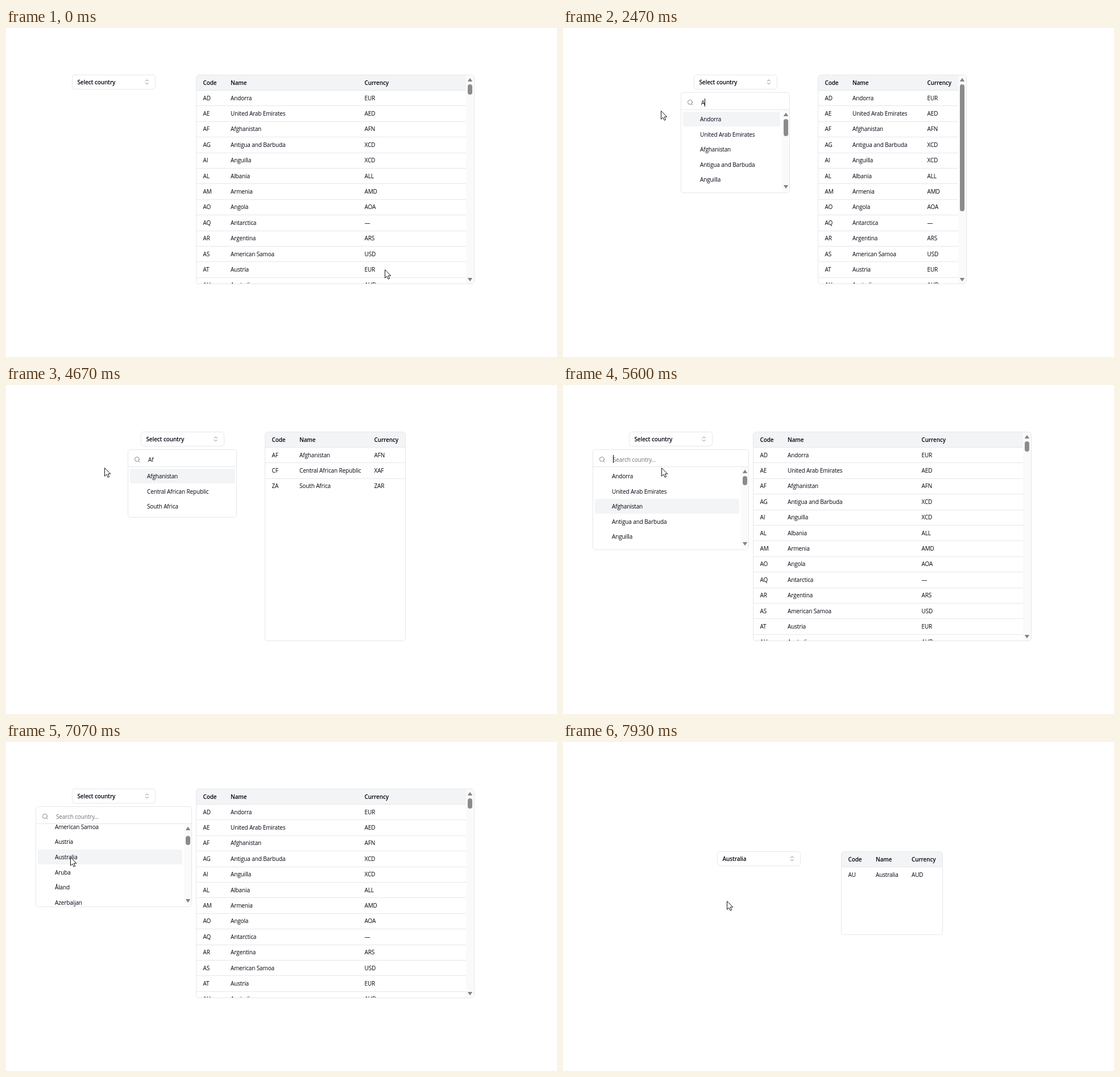
An HTML page for the animation above (8 s loop, 969 by 578 pixels).

```html
<!DOCTYPE html>
<html lang="en">
<head>
<meta charset="utf-8">
<title>Country picker</title>
<style>
  html, body { margin: 0; width: 100%; height: 100%; overflow: hidden; background: #fff; }
  body { position: relative; font: 10px/14px "Open Sans", "Noto Sans", sans-serif; letter-spacing: -.13px; color: #020210; }
  div, span, svg { position: absolute; box-sizing: border-box; }
  span { white-space: pre; }
  svg { fill: none; stroke: currentColor; overflow: visible; }
  .card { border: 1px solid #e5e7eb; border-radius: 5px; background: #fff; overflow: hidden; }
  .clip { overflow: hidden; }
  .head, .bar { background: #f3f4f6; }
  .bar { border-radius: 3px; }
  .line { background: #e5e7eb; }
  .track { background: #fafafa; }
  .thumb { background: #8b8b8b; border-radius: 4px; }
  .bold { font-weight: 600; }
  .hint { color: #71717a; }
  .icon { opacity: .5; stroke-width: 2; stroke-linecap: round; stroke-linejoin: round; }
  .arrow { fill: #858585; stroke: #858585; stroke-linejoin: round; }
  .caret { width: 1px; height: 14px; background: #000; }
  #cursor { left: 0; top: 0; fill: #fff; stroke: #111; }
</style>
</head>
<body>
<div id="ui"></div>
<svg id="cursor" width="12" height="19"><path d="M.5 .7V15.2L3.9 12L6.2 17.2L8.6 16.1L6.3 11.1H10.8Z"/></svg>
<script>
const LOOP = 8000, ROW = 27.4, ITEM = 26.55, ITEM_TOP = 146.5;
const rows = `AD|Andorra|EUR
AE|United Arab Emirates|AED
AF|Afghanistan|AFN
AG|Antigua and Barbuda|XCD
AI|Anguilla|XCD
AL|Albania|ALL
AM|Armenia|AMD
AO|Angola|AOA
AQ|Antarctica|—
AR|Argentina|ARS
AS|American Samoa|USD
AT|Austria|EUR
AU|Australia|AUD
AW|Aruba|AWG
AX|Åland|EUR
AZ|Azerbaijan|AZN`.split('\n').map(r => r.split('|'));

// width: table, currency: column offset, thumb / listThumb: scrollbar thumb heights
const views = {
  all: { rows, width: 490, currency: 296, thumb: 18, listThumb: 16, pop: 275 },
  a: { rows, width: 262, currency: 192, thumb: 223, listThumb: 30, pop: 192 },
  af: { rows: [rows[2], ['CF', 'Central African Republic', 'XAF'], ['ZA', 'South Africa', 'ZAR']],
        width: 248, currency: 192, pop: 192 },
  au: { rows: [rows[12]], width: 179, currency: 123.5, pop: 192 },
  loading: { rows: [], width: 169, currency: 113, pop: 192 }
};

// start time, view, query (null when the list is closed), chosen country
const phases = [
  [0, 'all', null], [725, 'all', ''],
  [2325, 'loading', 'A'], [2460, 'a', 'A'],
  [2865, 'loading', 'Af'], [3265, 'af', 'Af'],
  [4925, 'loading', 'A'], [5065, 'loading', ''],
  [5590, 'all', ''],
  [7395, 'loading', null, 'Australia'], [7665, 'au', null, 'Australia']
];
const path = [
  [35, 666, 424], [530, 196, 93], [720, 196, 93], [1440, 177, 147], [1790, 177, 147],
  [1930, 173, 145], [2110, 173, 145], [2130, 172, 145], [3590, 172, 145], [3660, 173, 145],
  [5620, 173, 145], [6400, 113, 202], [7430, 113, 202], [7930, 288, 279]
];
// the caret flips at each of these times, starting hidden
const blinks = [790, 900, 1430, 1925, 2325, 3595, 4065, 4660, 4925, 6130, 6600, 7050];

const ui = document.getElementById('ui'), cursor = document.getElementById('cursor');
const clamp = (v, lo, hi) => Math.min(hi, Math.max(lo, v));
const ease = (t, from, to) => {
  const p = clamp((t - from) / (to - from), 0, 1);
  return p * p * (3 - 2 * p);
};
const box = (x, y, w, h, cls, inner = '', style = '') =>
  `<div class="${cls}" style="left:${x}px;top:${y}px;width:${w}px;height:${h}px;${style}">${inner}</div>`;
const text = (x, middle, s, cls = '') =>
  `<span class="${cls}" style="left:${x}px;top:${middle - 7}px">${s}</span>`;
const icon = (x, y, shape) =>
  `<svg class="icon" viewBox="0 0 24 24" width="11.7" height="11.7" style="left:${x}px;top:${y}px">${shape}</svg>`;
const arrow = (x, y, dir) =>
  `<svg class="arrow" width="1" height="1" style="left:${x}px;top:${y}px"><path d="M-3.5 ${2.5 * dir}H3.5L0 ${-2.5 * dir}Z"/></svg>`;

function scrollbar(x, top, bottom, thumbTop, thumbHeight) {
  return box(x, top, 14, bottom - top, 'track') + arrow(x + 7, top + 8, 1) +
    box(x + 3, thumbTop, 8, thumbHeight, 'thumb') + arrow(x + 7, bottom - 7, -1);
}

function pointer(t) {
  let i = path.findIndex(k => k[0] > t);
  if (i < 0) i = path.length;
  const a = path[Math.max(0, i - 1)], b = path[Math.min(i, path.length - 1)];
  const p = a === b ? 0 : ease(t, a[0], b[0]);
  return [1, 2].map(n => Math.round(a[n] + (b[n] - a[n]) * p));
}

function trigger(x, y, label, hover) {
  return box(x, y, 147, 26, 'card' + (hover ? ' head' : '')) +
    text(x + 9.5, y + 13, label, 'bold') +
    icon(x + 125.7, y + 7.2, '<path d="m7 15 5 5 5-5M7 9l5-5 5 5"/>');
}

function table(view, x, y, h) {
  const w = view.width, inner = w - 2 - (view.thumb ? 14 : 0);
  const columns = [11.5, 60, view.currency - .5];
  const cells = (list, middle, cls) => list.map((s, i) => text(columns[i], middle, s, cls)).join('');
  let html = box(0, 0, inner, 26, 'head') + cells(['Code', 'Name', 'Currency'], 13, 'bold') +
    box(0, 26, inner, 1, 'line');
  view.rows.slice(0, 13).forEach((r, i) => {
    const top = 26 + i * ROW;
    html += cells(r, top + 13.6);
    if (i < view.rows.length - 1) html += box(0, Math.round(top + ROW), inner, 1, 'line');
  });
  if (view.thumb) html += scrollbar(inner, 0, h - 2, 16, view.thumb);
  return box(x, y, w, h, 'card', html);
}

function popover(view, x, query, t, hot, scroll) {
  const w = view.pop, bar = view.listThumb, count = view.rows.length;
  const h = bar ? 177 : 40 + Math.max(1, count) * ITEM;
  const shown = blinks.filter(b => b <= t).length % 2;
  const caret = shown ? '<i class="caret" style="display:inline-block;vertical-align:top"></i>' : '';
  const field = query ? query + caret : 'Search country...';
  let html = icon(9.5, 10.6, '<circle cx="11" cy="11" r="8"/><path d="m21 21-4.3-4.3"/>') +
    text(35, 16.5, field, query ? '' : 'hint') + box(0, 29, w - 2, 1, 'line');
  if (!query && shown) html += box(35, 9, 1, 14, 'caret');
  const items = view.rows.map((r, i) => {
    const top = ITEM_TOP - 144 + i * ITEM - scroll;
    const mark = i === hot ? box(3, top, w - (bar ? 21 : 7), 26.5, 'bar') : '';
    return mark + text(33, top + 13.5, r[1]);
  }).join('');
  html += box(0, 30, w - 2, h - 32, 'clip', items);
  if (bar) html += scrollbar(w - 15, 30, 172, 46 + scroll * .0165, bar);
  const p = clamp((t - 725) / 150, 0, 1);
  const grow = p < 1 ? `opacity:${p};transform:scale(${.95 + .05 * p});transform-origin:50% 0` : '';
  return box(x, 113, w, h, 'card', html, grow);
}

let last = '';
function draw(now) {
  const t = now % LOOP;
  const [, name, query, chosen] = phases.filter(p => p[0] <= t).pop();
  const view = views[name];
  const [px, py] = pointer(t);
  const x = 469.5 - (218 + view.width) / 2;
  const y = chosen ? 192 : 82;
  const scroll = 276.6 * ease(t, 6420, 7040);
  const hover = px >= x && px < x + 147 && py >= y && py < y + 26;
  let hot = 0;
  if (t > 5580) hot = py < 147 ? 2 : Math.floor((py - ITEM_TOP + scroll) / ITEM);

  let html = trigger(Math.round(x), y, chosen || 'Select country', hover) +
    table(view, Math.round(x + 218), y, chosen ? 147 : 368);
  if (query !== null) html += popover(view, Math.round(x + 73.5 - view.pop / 2), query, t, hot, scroll);
  if (html !== last) ui.innerHTML = last = html;
  cursor.style.transform = `translate(${px}px,${py}px)`;
  requestAnimationFrame(draw);
}
requestAnimationFrame(draw);
</script>
</body>
</html>
```
